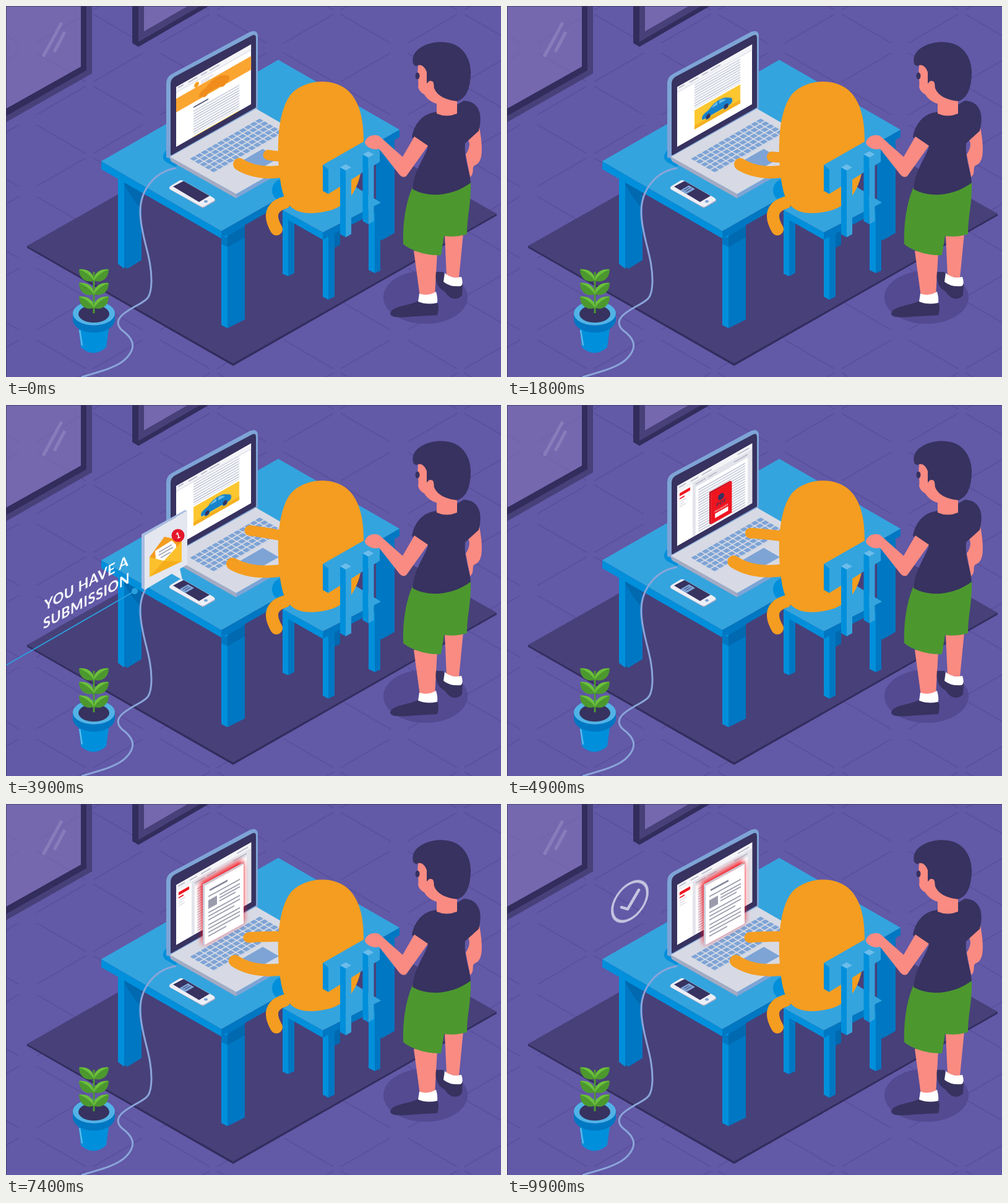
An HTML page without scripts for the animation above (10000 ms loop, 800 by 600 pixels).

```html
<!DOCTYPE html>
<html lang="en">
<head>
<meta charset="utf-8">
<title>Protected submission</title>
<style>
html,body{margin:0;width:100%;height:100%;overflow:hidden;background:#6259a7}
svg{display:block;width:100vw;height:100vh}
text{font-family:Lato,sans-serif;font-weight:700}
.caption{fill:#fff;font-size:23px;letter-spacing:.6px;text-anchor:middle}
.light{fill:#34a4de}.mid{fill:#008fdb}.deep{fill:#0077c2}.shade{fill:#0069b0}
.navy{fill:#37325f}.skin{fill:#f98b82}.steel{fill:#7ea4d6}.pale{fill:#d7dae4}
.dusk{fill:#484079}.white{fill:#fff}.orange{fill:#f49d20}.red{fill:#ef1520}
.arm{fill:none;stroke:#f49d20;stroke-linecap:round}
.beam{stroke-width:2;fill:none}
.ink{fill:none;stroke:#fff;stroke-linecap:round;stroke-linejoin:round}
.anim{animation:10s linear infinite both}

.scroll{animation-name:scroll}
@keyframes scroll{0%,3%{transform:none}11%{transform:translateY(-22px)}13%,14%{transform:translateY(-27px)}19%,100%{transform:translateY(-46px)}}
.sparks{animation-name:sparks;animation-timing-function:step-end}
@keyframes sparks{0%{opacity:0}5%{opacity:1}7%{opacity:0}9%{opacity:1}13%{opacity:0}15%{opacity:1}17%,100%{opacity:0}}
.message{animation-name:message;animation-timing-function:step-end}
@keyframes message{0%{opacity:0}18%,100%{opacity:1}}
.mail{transform-origin:285px 283px;animation-name:mail}
@keyframes mail{0%,18%{transform:scale(0)}22%{transform:scale(1.05)}24%,41%{transform:none}46%,100%{transform:scale(0)}}
/* shoulders stay put, hands move */
.far{animation-name:far}
@keyframes far{0%,3%{d:path("M424 241Q450 246 490 240")}24%,27%{d:path("M430 245Q450 247 490 240")}
33%,36%,39%,43%,50%,54%,62%{d:path("M394 203Q420 206 470 216")}
30%,41%,46%,47%,52%,57%,60%,64%,100%{d:path("M392 216Q420 213 470 215")}}
.near{animation-name:near}
@keyframes near{0%,27%{d:path("M377 256Q408 275 455 266")}
33%,36%,39%,43%,50%,54%,62%{d:path("M366 257Q400 276 455 266")}
30%,41%,46%,47%,52%,57%,60%,64%,69%{d:path("M367 246Q400 275 455 265")}
74%,100%{d:path("M370 254Q402 275 455 266")}}
.beam1{animation-name:beam1}
@keyframes beam1{0%,24%{transform:translate(-220px,127px);opacity:1}26%{transform:translate(-25px,14.5px)}30%,42%{transform:none;opacity:1}49%,100%{transform:none;opacity:0}}
.text1{animation-name:text1}
@keyframes text1{0%,24%{transform:translate(-220px,121px);opacity:1}26%{transform:translate(-92px,50px)}29%{transform:translate(-14px,8px)}33%,40%{transform:none;opacity:1}46%,100%{transform:none;opacity:0}}
.viewer{animation-name:viewer;animation-timing-function:step-end}
@keyframes viewer{0%{opacity:0}43%,100%{opacity:1}}
.lock{transform-origin:346px 160px;animation-name:lock}
@keyframes lock{0%,47%{transform:scale(0);opacity:1}51%{transform:scale(1.08)}53%,69%{transform:none;opacity:1}72%,100%{transform:none;opacity:0}}
.beam2{animation-name:beam2}
@keyframes beam2{0%,50%{transform:translate(-260px,150px);opacity:1}53%{transform:translate(-30px,17px)}56%,69%{transform:none;opacity:1}73%,100%{transform:none;opacity:0}}
.text2{animation-name:text2}
@keyframes text2{0%,50%{transform:translate(-260px,145px);opacity:1}53%{transform:translate(-70px,39px)}57%,69%{transform:none;opacity:1}73%,100%{transform:none;opacity:0}}
.sheet{transform-origin:350px 162px;animation-name:sheet}
@keyframes sheet{0%,69%{transform:scale(.8);opacity:0}72%{transform:scale(1.05);opacity:1}74%,100%{transform:none;opacity:1}}
.beam3{animation-name:beam3}
@keyframes beam3{0%,78%{transform:translate(-260px,150px);opacity:1}81%{transform:translate(-34px,20px)}85%,96.5%{transform:translate(-4px,2px);opacity:1}99%,100%{transform:translate(-4px,2px);opacity:0}}
.badge{animation-name:badge}
@keyframes badge{0%,78%{transform:translate(-240px,138px);opacity:1}81%{transform:translate(-60px,35px)}85%,96.5%{transform:none;opacity:1}99%,100%{transform:none;opacity:.65}}
.tick{stroke-dasharray:1 2;animation-name:tick}
@keyframes tick{0%,86%{stroke-dashoffset:1;opacity:0}86.1%{stroke-dashoffset:1;opacity:1}89%,100%{stroke-dashoffset:0;opacity:1}}
</style>
</head>
<body>
<svg viewBox="0 0 800 600" preserveAspectRatio="none">
<defs>
  <pattern id="tiles" width="200" height="116" patternUnits="userSpaceOnUse" x="35" y="68">
    <path d="M14 8 94 54.5M106 61.5 186 108M14 108 94 61.5M106 54.5 186 8" stroke="#594f9c" stroke-width="1.800"/>
  </pattern>
  <pattern id="keys" width="8.8" height="8" patternUnits="userSpaceOnUse"><rect width="7.2" height="6.2" rx=".8" class="steel"/></pattern>
  <pattern id="rows" width="80" height="4.2" patternUnits="userSpaceOnUse"><rect width="80" height="1.3" fill="#aab0c6"/></pattern>
  <linearGradient id="trail" gradientUnits="userSpaceOnUse" x1="20" y1="311" x2="130" y2="248">
    <stop stop-color="#2aa0dd" stop-opacity="0"/><stop offset="1" stop-color="#2aa0dd"/>
  </linearGradient>
  <filter id="blur" x="-30%" y="-30%" width="160%" height="160%"><feGaussianBlur stdDeviation="4"/></filter>
  <clipPath id="display"><path d="M0 0H121V97H0Z"/></clipPath>
  <g id="car">
    <path d="M0 12C0 6 6 6 12 4C19 -4 34 -4 42 2L48 6Q51 13 46 15H3Q0 15 0 12Z"/>
    <circle cx="10" cy="14" r="4.500"/><circle cx="39" cy="14" r="4.500"/>
  </g>
  <g id="leaves">
    <path fill="#4c982f" d="M142 444C130 449 118 441 118 426C133 424 142 433 142 444ZM142 444C154 449 166 441 166 426C151 424 142 433 142 444Z"/>
    <path fill="#6cc03c" d="M142 444Q133 431 118 426C133 424 142 433 142 444ZM142 444Q151 431 166 426C151 424 142 433 142 444Z"/>
  </g>
  <g id="beamTip"><path class="beam" d="M-20 333.500 246 181" stroke="url(#trail)"/><circle cx="246" cy="181" r="5" fill="#2aa0dd"/></g>
</defs>

<!-- room -->
<rect width="800" height="600" fill="#6259a7"/>
<rect width="800" height="600" fill="url(#tiles)"/>
<path class="dusk" d="M130 0H139V109L0 188V176L130 102Z"/>
<path fill="#322d5c" d="M121 0H130V104L0 178V166L121 98Z"/>
<path fill="#8a78b8" opacity=".5" d="M0 0H121V98L0 166Z"/>
<path stroke="#8f84c0" stroke-width="5" opacity=".75" d="M60 82 90 27M78 74 95 42"/>
<path fill="#322d5c" d="M204 0V60L214 66 328 0Z"/>
<path class="dusk" d="M214 0V58L314 0Z"/>
<path fill="#7568ae" d="M223 0V41L294 0Z"/>
<path fill="#332d5e" d="M34 388V391L367 582 793 339V336Z"/>
<path class="dusk" d="M34 388 460 146 793 336 367 578Z"/>
<ellipse cx="678" cy="471" rx="68" ry="43" fill="#534a92"/>

<!-- desk -->
<path class="deep" d="M598 222 628 207V367L607 379 598 374Z"/>
<path class="mid" d="M181 275 191 281V425L181 417Z"/>
<path class="deep" d="M191 280 219 292V411L196 425 191 422Z"/>
<path class="shade" d="M191 285 219 301V328Q204 313 191 288Z"/>
<path class="mid" d="M348 370H358V521L348 516Z"/>
<path class="deep" d="M358 366 386 352V507L358 521Z"/>
<path class="shade" d="M358 372 386 356V374L358 390Z"/>
<path class="deep" d="M348 374 358 374V390L348 385Z"/>
<path class="mid" d="M154 251 348 364V376L154 264Z"/>
<path class="deep" d="M348 364 636 200V212L348 376Z"/>
<path class="light" d="M154 251 440 87 636 200 348 364Z"/>
<path class="mid" d="M262 230Q248 243 258 252L275 261 280 245Z"/>
<ellipse class="mid" cx="447" cy="298" rx="17" ry="18"/>

<path fill="none" stroke="#8aa5d9" stroke-width="3" d="M275 262C240 268 216 298 217 335C218 375 236 405 235 447C234 473 228 475 212 484C190 496 171 508 187 524C205 537 212 551 195 569C182 584 150 592 122 600"/>

<!-- laptop -->
<path class="steel" d="M259 245V125Q259 115 268 110L394 42Q406 37 407 48V166L268 247Z"/>
<path class="navy" d="M266 241V126Q266 118 273 114L397 48Q404 44 404 52V164L268 241Z"/>
<path fill="#a3abc4" d="M265 243 372 304V311L268 252Q264 249 265 243Z"/>
<path class="steel" d="M372 304 508 226V233L372 311Z"/>
<path class="pale" d="M265 244 404 166 508 226 372 304Z"/>
<rect width="114" height="40" fill="url(#keys)" transform="matrix(1 -.577 1 .577 297 247)"/>
<path class="steel" d="M375 254 415 231 441 246 400 269Z"/>

<g transform="matrix(1 -.57 0 1 275 131)">
  <g clip-path="url(#display)">
    <rect width="121" height="97" class="white"/>
    <g class="anim scroll">
      <rect y="19" width="121" height="22" fill="#fba531"/>
      <use href="#car" x="37" y="24" fill="#f08c1c"/>
      <circle cx="33" cy="15" r="4" class="orange"/>
      <path d="M40 14H60M40 17H54" stroke="#b9bccb"/>
      <path d="M28 49H52" stroke="#555374" stroke-width="2"/>
      <rect x="28" y="54" width="74" height="39" fill="url(#rows)"/>
      <rect x="28" y="96" width="74" height="31" fill="#fcc62f"/>
      <path d="M28 121H102V127H28Z" fill="#f5b01f"/>
      <use href="#car" x="40" y="104" fill="#1683cc"/>
      <path d="M55 108Q60 103 65 103V108ZM68 103Q75 103 79 108H68Z" fill="#6bbcea"/>
      <circle cx="50" cy="118" r="3.500" class="navy"/><circle cx="79" cy="118" r="3.500" class="navy"/>
    </g>
    <rect width="121" height="9" fill="#f4f4f8"/>
    <path d="M3 3H12M20 4H34M40 4H50M54 4H70" stroke="#a4a7bb" stroke-width="1.500"/>
    <path d="M0 9H121" stroke="#d0d2de"/>
    <g class="anim viewer">
      <rect width="121" height="97" fill="#e3e4eb"/>
      <rect width="121" height="9" fill="#f4f4f8"/>
      <path d="M3 4H14M22 5H34M40 5H56M98 5H116M30 14H46M50 14H64M92 14H114" stroke="#b7bac8" stroke-width="2"/>
      <rect y="10" width="25" height="87" class="white"/>
      <rect x="4" y="14" width="17" height="5" class="red"/>
      <path d="M4 23H12" stroke="#ef1520" stroke-width="2"/>
      <path d="M4 28H15M4 32H12M4 36H14" stroke="#c4c6d2"/>
      <rect x="30" y="19" width="84" height="78" class="white"/>
      <rect x="34" y="23" width="76" height="72" fill="url(#rows)"/>
    </g>
  </g>
</g>

<!-- phone -->
<path fill="#a5abc3" d="M264 292V296L318 327 338 316V312L318 324Z"/>
<path fill="#eceef5" d="M266 291 281 282Q285 281 289 284L335 310Q339 313 336 315L321 324Q317 326 313 323L266 297Q262 294 266 291Z"/>
<path class="navy" d="M270 292 287 283 329 307 312 317Z"/>
<ellipse cx="323" cy="316" rx="3" ry="2" class="steel"/>
<g class="anim message"><path class="steel" d="M280 298 294 290 304 296 290 304Z"/><path d="M286 298 294 293.500M289 300 298 295" stroke="#37325f"/></g>
<path class="anim sparks ink" stroke-width="3" d="M252 283 258 291M247 296H258M252 309 258 304M343 306 348 297M343 310 354 309M343 315 352 321"/>

<!-- chair seat -->
<path class="shade" d="M531 365 540 360V386L531 391Z"/>
<path class="mid" d="M447 331 456 336V437L447 433Z"/><path class="deep" d="M456 336H466V432L456 437Z"/>
<path class="mid" d="M586 325 596 322V432L586 427Z"/><path class="deep" d="M596 322 605 318V428L596 432Z"/>
<path class="mid" d="M512 366 521 367V475L512 470Z"/><path class="deep" d="M521 367 531 360V470L521 475Z"/>
<path class="mid" d="M447 330 512 366V378L447 341Z"/>
<path class="deep" d="M512 366 606 318V329L512 378Z"/>
<path class="light" d="M447 330 545 280 606 318 512 366Z"/>

<!-- typist -->
<path class="anim far arm" stroke-width="17" d="M424 241Q450 246 490 240"/>
<path class="arm" stroke-width="20" d="M450 318Q418 328 437 361"/>
<path class="orange" d="M461 142C486 116 534 116 556 140C574 160 578 190 578 218C578 300 553 335 490 335C460 334 448 318 443 280C439 250 434 176 461 142Z"/>
<path class="anim near arm" stroke-width="20" d="M377 256Q408 275 455 266"/>

<!-- chair back -->
<path class="light" d="M512 257 582 217 604 224V252L521 304V264Z"/>
<path class="mid" d="M512 257 521 264V304L512 299Z"/>
<g id="post"><path class="mid" d="M540 261 549 266V374L540 369Z"/><path class="light" d="M549 266 558 261V369L549 374Z"/><path fill="#6bbcea" d="M540 261 549 256 558 261 549 266Z"/></g>
<use href="#post" x="36.500" y="-21"/>

<!-- boy -->
<path class="skin" d="M709 370 712 437 732 440 739 368ZM659 396 669 470H693L697 398Z"/>
<path class="navy" d="M695 430C693 445 697 455 709 462C718 476 730 476 737 468L738 448Q715 453 707 430Z"/>
<path class="white" d="M709 432Q721 442 736 438Q740 450 735 453Q718 455 707 446Z"/>
<path class="navy" d="M668 476C650 486 625 484 621 497C621 505 640 504 660 502L697 500C700 490 699 482 697 480Q680 484 668 476Z"/>
<path class="white" d="M668 465Q682 470 695 462Q698 472 697 480Q680 484 666 478Z"/>
<path fill="#4c982f" d="M657 293C645 320 641 355 642 385C660 400 690 404 703 403L708 372C720 374 735 372 745 369C745 340 752 320 751 284Z"/>
<path class="skin" d="M765 196C772 235 770 254 757 258C752 262 758 270 750 277L743 240C750 230 752 218 742 212Z"/>
<path class="navy" d="M692 172C676 174 660 188 656 212L682 228C675 248 660 265 657 296C680 310 720 309 751 286C750 265 740 250 742 222L764 202C772 172 762 154 740 153L720 165Z"/>
<path class="skin" d="M667 90C663 113 668 120 666 131Q668 139 676 143C682 153 690 156 696 158V174Q712 181 729 174V140L700 92Z"/>
<path class="navy" d="M658 93C652 68 688 55 712 59C740 62 752 88 751 110C750 137 742 150 729 154C712 152 697 146 692 133L690 122 680 125 680 107C677 98 670 93 664 97Q660 97 658 93Z"/>
<ellipse class="skin" cx="686" cy="128" rx="5.500" ry="7"/>
<ellipse class="navy" cx="665" cy="113" rx="3.500" ry="5.500"/>
<path class="skin" d="M660 211 682 226 647 275Q642 279 636 273L603 231C592 234 580 227 580 220C583 209 597 206 604 211L641 244Z"/>

<!-- plant -->
<path class="mid" d="M117 515 121 552Q141 570 162 552L167 515Z"/>
<path stroke="#5bb8ea" stroke-width="2.500" d="M119 524 123 549"/>
<path class="deep" d="M108 497V508C112 535 172 535 176 508V497Z"/>
<ellipse fill="#52b2e6" cx="142" cy="497" rx="34" ry="19.500"/>
<ellipse class="navy" cx="142" cy="498" rx="25" ry="14"/>
<path stroke="#4c982f" stroke-width="3" d="M142 430V497"/>
<use href="#leaves"/><use href="#leaves" y="22"/><use href="#leaves" y="44"/>

<!-- mail notice -->
<g class="anim mail">
  <path fill="#a8bce0" d="M219 209 289 170 293 171 224 211V299L219 296Z"/>
  <path fill="#e4e7ef" d="M224 211 293 171V258L281 265 285 283 268 273 224 299Z"/>
  <path fill="#f39c1f" d="M232 246 256 213 284 219V240L232 270Z"/>
  <path class="white" d="M241 236 268 219 275 226V246L243 262Z"/>
  <path d="M247 238 268 226M247 243 270 230M250 247 266 238" stroke="#a4a7bb" stroke-width="2"/>
  <path fill="#fcc02d" d="M232 246 255 252 284 221V253L232 278Z"/>
  <path fill="#f7ae1d" d="M232 278 255 252 284 253Z"/>
  <circle cx="278" cy="211" r="10.500" fill="#e4172c"/>
  <text x="278" y="215.500" class="white" font-size="13" text-anchor="middle" transform="rotate(-15 278 211)">1</text>
</g>

<!-- password panel -->
<g class="anim lock">
  <path fill="#c4101f" d="M311 125 373 91 378 92 316 128V221L311 219Z"/>
  <g transform="matrix(1 -.57 0 1 316 127)">
    <rect width="62" height="94" class="red"/>
    <circle cx="30" cy="28" r="9" class="navy"/>
    <text x="31" y="51" class="navy" font-size="14" letter-spacing="1" text-anchor="middle">PDF</text>
    <text x="31" y="65" class="white" font-size="6.500" letter-spacing=".5" text-anchor="middle">PASSWORD</text>
    <rect x="12" y="69" width="39" height="13" class="white"/>
  </g>
</g>

<!-- opened sheet -->
<g class="anim sheet">
  <path class="red" filter="url(#blur)" d="M314 127 380 90 384 98V190L318 227Z"/>
  <path fill="#c9cbd6" d="M318 130 381 96 384 97 321 132V228L318 226Z"/>
  <g transform="matrix(1 -.55 0 1 321 132)">
    <rect width="63" height="96" class="white"/>
    <path d="M8 12H37" stroke="#85889b" stroke-width="3"/>
    <path d="M6 21H57M24 28H57M24 33H57M24 38H50M6 47H57M6 53H57M6 59H48M6 67H57M6 73H57M6 79H57M6 85H35" stroke="#9a9cac" stroke-width="2"/>
    <rect x="6" y="27" width="14" height="14" fill="#9a9cac"/>
  </g>
</g>

<!-- captions -->
<g class="anim beam1"><path class="beam" stroke="#2aa0dd" d="M-20 432.500 208 301"/><circle cx="208" cy="301" r="5" fill="#2aa0dd"/></g>
<g class="anim text1"><g class="caption" transform="matrix(.95 -.515 0 1 130 296)"><text>YOU HAVE A</text><text y="29">SUBMISSION</text></g></g>
<g class="anim beam2"><use href="#beamTip"/></g>
<g class="anim text2"><g class="caption" transform="matrix(.95 -.535 0 1 145 195)"><text>ENTER PASSWORD</text><text y="27">TO OPEN</text></g></g>
<g class="anim beam3"><use href="#beamTip"/></g>
<g class="anim badge">
  <circle class="ink" r="29" stroke-width="4" transform="matrix(.98 -.5 0 1 198.500 157.500)"/>
  <path class="anim tick ink" pathLength="1" stroke-width="4.500" d="M185 167 195 170 213 139"/>
</g>
<path d="M.5 600V.5H800" fill="none" stroke="#37325f" opacity=".7"/>
</svg>
</body>
</html>
```
